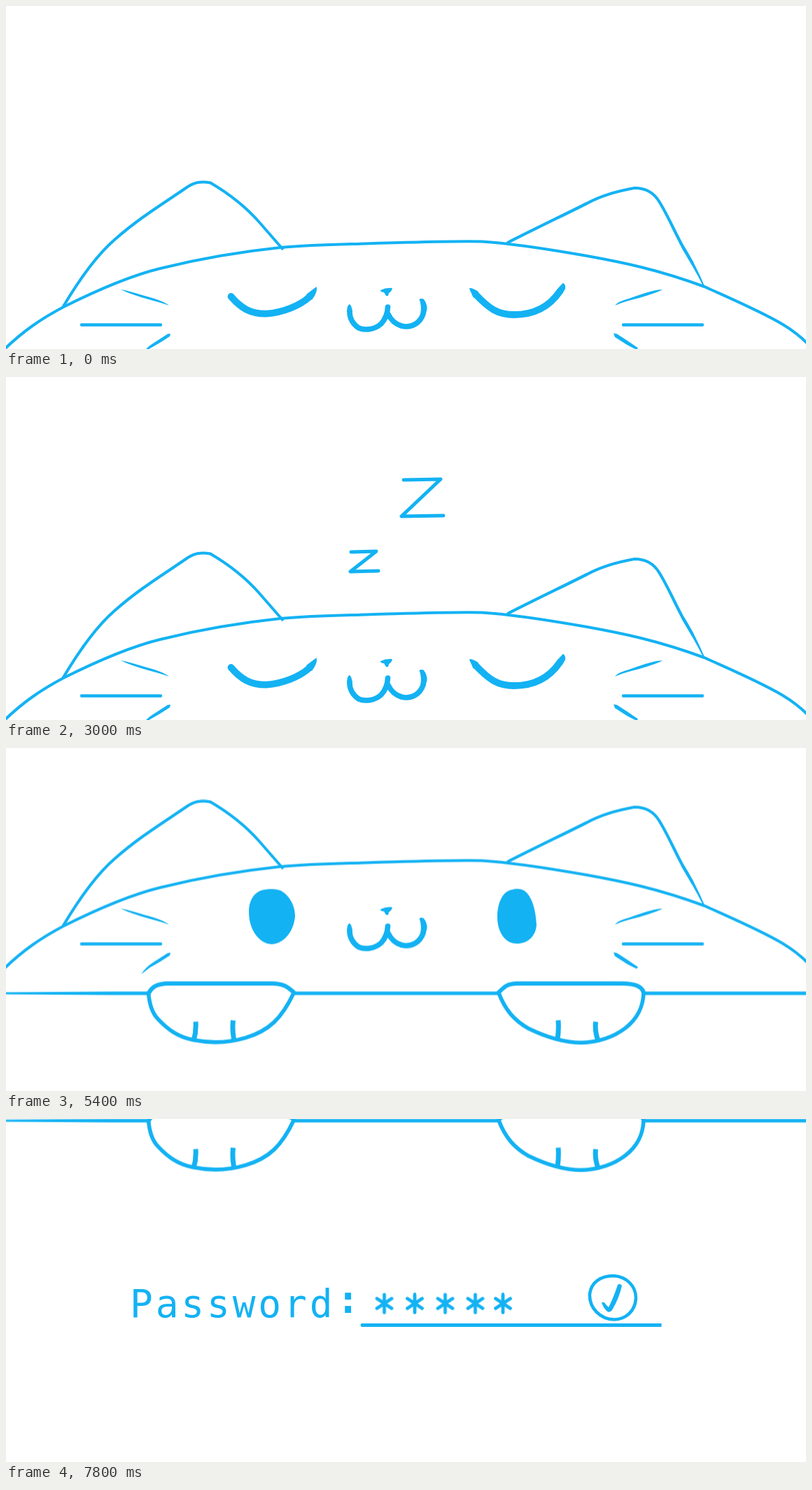
Write an HTML page that moves like this. It is 1143 by 490 pixels and loops after 8000 ms.

```html
<!DOCTYPE html>
<html lang="en">
<head>
<meta charset="utf-8">
<title>Sleepy cat password</title>
<style>
html, body { margin: 0; width: 100%; height: 100%; overflow: hidden; background: #fff; }
svg { display: block; width: 100%; height: 100%; }
svg { --ink: #13b2f3; fill: none; stroke: var(--ink); stroke-width: 4.2; stroke-linecap: round; stroke-linejoin: round; }
.solid { fill: var(--ink); stroke: none; }
.butt { stroke-linecap: butt; }
text { font: 400 54.5px "DejaVu Sans Mono", monospace; letter-spacing: 3.85px; }
text .colon { font-weight: 700; letter-spacing: 0; }

/* every change is a hard cut */
.step { animation: 8s step-end infinite; }
#scene { animation-name: rise; }
#z1 { animation-name: z1; }
#z2 { animation-name: z2; }
#z3 { animation-name: z3; }
#asleep { animation-name: asleep; }
#awake { animation-name: awake; }
#startle { animation-name: startle; }
#field { animation-name: field; }
#s1 { animation-name: s1; }
#s2 { animation-name: s2; }
#s3 { animation-name: s3; }
#s4 { animation-name: s4; }
#s5 { animation-name: s5; }
#tick { animation-name: tick; }

@keyframes rise {
  0% { transform: translateY(0); }
  65% { transform: translateY(-70.5px); }
  67.5% { transform: translateY(-175.6px); }
  70% { transform: translateY(-317.6px); }
  72.5%, 100% { transform: translateY(-523.6px); }
}
@keyframes z1 { 0%, 25%, 50%, 100% { opacity: 0; } 6.25%, 31.25% { opacity: 1; } }
@keyframes z2 { 0%, 25%, 50%, 100% { opacity: 0; } 12.5%, 37.5% { opacity: 1; } }
@keyframes z3 { 0%, 25%, 50%, 100% { opacity: 0; } 18.75%, 43.75% { opacity: 1; } }
@keyframes asleep { 0% { opacity: 1; } 56.25%, 100% { opacity: 0; } }
@keyframes awake { 0% { opacity: 0; } 56.25%, 100% { opacity: 1; } }
@keyframes startle { 0%, 62.5%, 100% { opacity: 0; } 56.25% { opacity: 1; } }
@keyframes field { 0% { opacity: 0; } 78.75%, 100% { opacity: 1; } }
@keyframes s1 { 0% { opacity: 0; } 85%, 100% { opacity: 1; } }
@keyframes s2 { 0% { opacity: 0; } 87.5%, 100% { opacity: 1; } }
@keyframes s3 { 0% { opacity: 0; } 90%, 100% { opacity: 1; } }
@keyframes s4 { 0% { opacity: 0; } 92.5%, 100% { opacity: 1; } }
@keyframes s5 { 0% { opacity: 0; } 95%, 100% { opacity: 1; } }
@keyframes tick { 0% { opacity: 0; } 97.5%, 100% { opacity: 1; } }
</style>
</head>
<body>
<svg viewBox="0 0 1143 490">
  <defs>
    <path id="star" stroke-width="4.8" d="M0-12.5V13M-10.5-7L10.5 7M10.5-7L-10.5 7"/>
  </defs>

  <g id="scene" class="step">
    <!-- head and ears -->
    <path stroke-width="4" d="M-3 491C25 464 50 447 82 430C120 411 175 386 220 375C280 360 335 351 392 345C440 340.5 480 340.5 520 339.3C570 338 630 335.5 680 336.5C725 339 790 350 830 357C880 366 930 376 998 401C1040 420 1080 437 1110 455C1125 464 1135 472 1146 483"/>
    <path d="M82 429C110 382 133 353 155 334C190 303 225 282 257 260C268 252 278 250 292 252.5"/>
    <path stroke-width="4" class="butt" d="M292 252.5C315 266 340 284 362 309L396 348"/>
    <path d="M717 338C740 326 800 297 830 282C850 271 870 265 898 260C912 260 925 266 933 279C945 298 955 322 967 344L981 368"/>
    <path class="solid" d="M965 345L969 343Q986 371 998.5 401L996 400Q985 378 965 345Z"/>

    <!-- whiskers -->
    <path stroke-width="4.4" d="M108 455.5H221M882 455.5H995"/>
    <g class="solid">
      <path d="M164 405Q170 405.5 198 414Q225 421 233 428Q224 424.5 205 419.5Q178 412 164 405Z"/>
      <path d="M235 468L234 472Q219 482 206 489L193 499Q200 488 210 482L231 468.5Z"/>
      <path d="M938 405Q932 409 905 417Q880 423 870 428Q874 422 890 418Q925 405 938 405Z"/>
      <path d="M868 467.5L873 468.5Q888 478 903 488.5L901 491Q888 485 881 480L870 473Z"/>
    </g>

    <!-- nose and mouth -->
    <path class="solid" d="M535 406Q543 402 552 403Q551 408 547 410L546 414L543 414L540 409Q535 409 535 406Z"/>
    <path stroke-width="7.6" d="M545.5 430Q545 444 536 454C527 462 514 464 504 460C496 455 490.5 446 491 436M546 440Q552 453 565 457C580 461 592 452 596 440"/>
    <path class="solid" d="M487.2 437Q487 428 490.5 426Q494 427 494.8 437Z"/>
    <path class="solid" d="M592.3 439Q594 428 590.5 419Q594 417 597 419Q602 426 601.5 433L599.5 441Z"/>

    <!-- eyes -->
    <g id="asleep" class="step">
      <path stroke-width="9.8" d="M321.5 415C336 432 350 440 372 439.7C395 438 420 428 433 416M671 412C690 432 702 441 726 441C757 441 778 427 791 408"/>
      <path class="solid" d="M429 412L443.5 401Q446 408 437 420ZM662 404Q663 401 675 408L668 417ZM787 405L796 395.5Q800 398 799 404L795 411Z"/>
    </g>
    <g id="awake" class="step solid">
      <path d="M369 378Q382 375.5 392 379C404 385 413 400 413 415C412 437 397 455 380 456C360 455 347 433 347 410C347 393 355 380 369 378Z"/>
      <path d="M723 378Q732 375 740 379C752 387 757 408 758 428C757 445 745 455 730 455C712 455 702 437 702 417C702 398 709 380 723 378Z"/>
    </g>

    <g id="startle" class="step">
      <path stroke-width="7" d="M519 463C520 478 530 484 545 484C560 484 570 476 572 459"/>
      <path stroke-width="5" d="M412 232L450 300M548 211V298M683 232L645 300"/>
    </g>

    <!-- desk edge and paws -->
    <g transform="translate(0 175.6)">
      <path class="solid" d="M0 349L150 348H204V353H150L0 352Z"/>
      <path stroke-width="5" d="M412 350.5H703M911 350.5H1150"/>
      <path stroke-width="6" d="M204 350C208 342 214 338 228 336.5H380C396 336.5 402 341 411 349M704 349C712 342 714 337 730 336.5H880C900 336.5 908 341 911 349"/>
      <path stroke-width="5.6" d="M203.5 350C205 367 209 379 217 387C233 404 247 413 267 417C297 423 322 420 342 414C376 404 394 386 411 350M704 350C713 374 726 389 747 401C776 415 800 421 822 421C848 420 868 413 885 400C903 386 910 370 911 350"/>
      <path stroke-width="7" class="butt" d="M271 391Q272 405 268 418M324.5 389Q323 402 325.5 416M789 389Q790 402 788 416M842.5 391Q841 405 846 418"/>
    </g>
  </g>

  <!-- snores -->
  <g stroke-width="5">
    <path id="z1" class="step" d="M493 250L529 249L492 278L532 277"/>
    <path id="z2" class="step" d="M568 147L621 146L565 199L625 198"/>
    <path id="z3" class="step" d="M476 39L556 37L471 113L562 111"/>
  </g>

  <!-- password field -->
  <g id="field" class="step">
    <text class="solid" x="177" y="283">Password<tspan class="colon" x="472.3" y="277">:</tspan></text>
    <path class="solid" d="M508 292H936.5V297H508Q505 294.5 508 292Z"/>
  </g>
  <use href="#star" id="s1" class="step" x="540.5" y="263.5"/>
  <use href="#star" id="s2" class="step" x="584" y="263.5"/>
  <use href="#star" id="s3" class="step" x="627.5" y="263.5"/>
  <use href="#star" id="s4" class="step" x="670.5" y="263.5"/>
  <use href="#star" id="s5" class="step" x="710" y="263.5"/>
  <g id="tick" class="step">
    <path stroke-width="4.6" d="M834 250C836 233 850 224 868 224C887 225 900 239 900 256C899 274 886 286 869 286.5C849 286 833 270 834 250Z"/>
    <path class="solid" d="M851 262Q855 261 857 265L861 269Q868 255 874 237Q877 234 880 238Q876 256 866 273Q862 278 858 274Q853 269 851 262Z"/>
  </g>
</svg>
</body>
</html>
```
